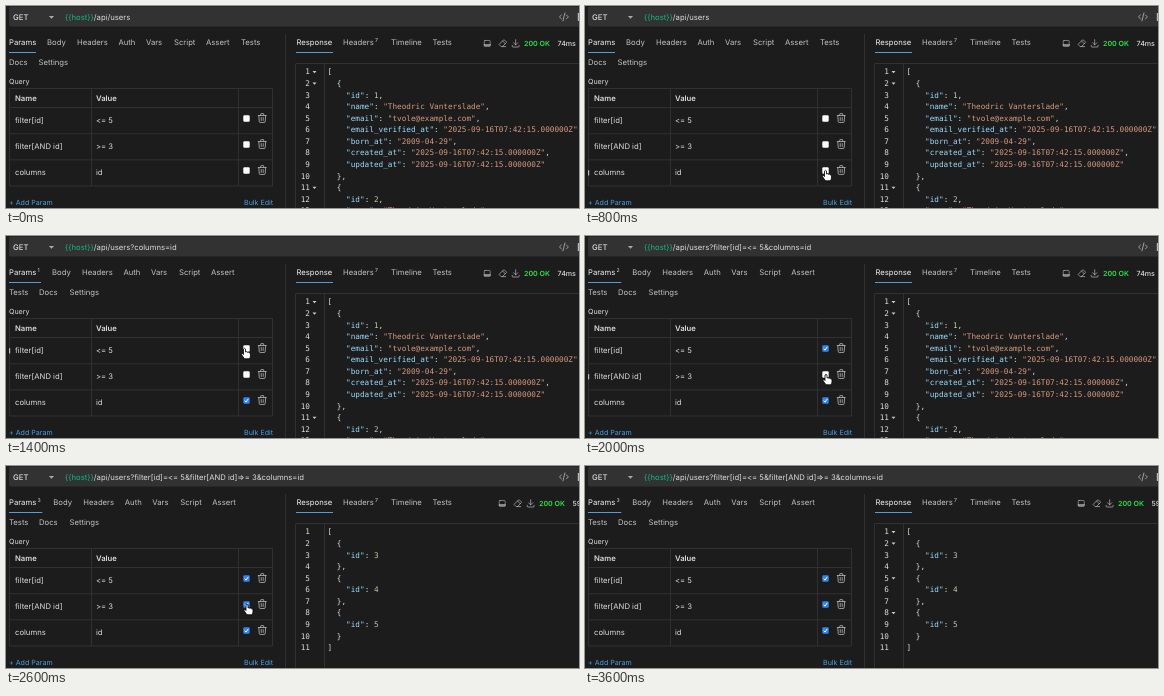
Recreate the animation shown at these times as an HTML page. Size 573 px wide and 202 px high, loop 3800 ms.

```html
<!DOCTYPE html>
<html lang="en">
<head>
<meta charset="utf-8">
<style>
html, body { margin: 0; width: 100%; height: 100%; overflow: hidden; background: #1c1c1c; }
svg { display: block; width: 573px; height: 202px; }
text { font: 7.7px Inter, sans-serif; fill: #dcdcdc; white-space: pre; text-rendering: geometricPrecision; }
.tab { fill: #c2c2c2; }
.active { fill: #f2f2f2; }
.small { font-size: 7.1px; }
.sup { font-size: 5.2px; }
.bold { font-weight: 600; }
.medium { font-weight: 500; }
.link { fill: #4a9fe0; }
.host { fill: #12b886; }
.ok { fill: #26e04a; font-weight: 600; }
.code { font: 7.69px "DejaVu Sans Mono", monospace; fill: #dedede; }
.num { text-anchor: end; }
.key { fill: #9cdcfe; }
.string { fill: #d69a80; }
.number { fill: #b5cea8; }
.rule { fill: none; stroke: #363636; stroke-width: .8; }
.icon { fill: none; stroke: #c4c4c4; stroke-width: 1.5; stroke-linecap: round; stroke-linejoin: round; }
</style>
</head>
<body>
<svg id="stage" viewBox="0 0 573 202"></svg>
<script>
const STEP = 200, LOOP = 3800;
const stage = document.getElementById('stage');

const label = (x, y, s, cls = '') => `<text x="${x}" y="${y}" class="${cls}">${s}</text>`;
const rule = d => `<path class="rule" d="${d}"/>`;
const underline = (x, w) => `<rect x="${x}" y="46" width="${w}" height="1" fill="#569cd6"/>`;
const icon = (x, y, d, scale = .494) =>
  `<path class="icon" transform="translate(${x} ${y}) scale(${scale})" d="${d}"/>`;
const caret = (x, y, w, color) =>
  `<path fill="${color}" d="M${x - w} ${y - w / 2}h${2 * w}l${-w} ${w * 1.1}z"/>`;
const escapeHtml = s => s.replace(/&/g, '&amp;').replace(/</g, '&lt;').replace(/>/g, '&gt;');

const ICONS = {
  trash: 'M4 7h16M10 11v6M14 11v6M5 7l1 12a2 2 0 0 0 2 2h8a2 2 0 0 0 2-2l1-12M9 7V4a1 1 0 0 1 1-1h4a1 1 0 0 1 1 1v3',
  code: 'M7 8l-4 4l4 4M17 8l4 4l-4 4M14 4l-4 16',
  eraser: 'M19 20H8.5l-4.2-4.3a1 1 0 0 1 0-1.4l10-10a1 1 0 0 1 1.4 0l5 5a1 1 0 0 1 0 1.4L11.5 20M18 13.3L11.7 7',
  download: 'M4 17v2a2 2 0 0 0 2 2h12a2 2 0 0 0 2-2v-2M7 11l5 5l5-5M12 4v12',
  panel: 'M6 4h12a2 2 0 0 1 2 2v12a2 2 0 0 1-2 2H6a2 2 0 0 1-2-2V6a2 2 0 0 1 2-2zM4 15h16M4 16.5h16M4 18h16'
};

const params = [
  { name: 'filter[id]', value: '<= 5', y: 112.5, checkedAt: 1600 },
  { name: 'filter[AND id]', value: '>= 3', y: 138.5, checkedAt: 2200 },
  { name: 'columns', value: 'id', y: 164.5, checkedAt: 1000 }
];

const fullResponse = `[
  {
    "id": 1,
    "name": "Theodric Vanterslade",
    "email": "tvole@example.com",
    "email_verified_at": "2025-09-16T07:42:15.000000Z",
    "born_at": "2009-04-29",
    "created_at": "2025-09-16T07:42:15.000000Z",
    "updated_at": "2025-09-16T07:42:15.000000Z"
  },
  {
    "id": 2,
    "name": "Theodric Vanterslade",`.split('\n');
const idResponse = JSON.stringify([{ id: 3 }, { id: 4 }, { id: 5 }], null, 2).split('\n');

// Pointer poses and hovered rows, each held until the next entry.
const pointerTrack = [
  [0], [200, 'arrow', 249, 190], [400, 'arrow', 244, 170], [600, 'hand', 240.5, 164],
  [1000, 'arrow', 241, 122], [1200, 'hand', 239.5, 113], [1400, 'hand', 238.5, 112],
  [1800, 'hand', 241, 135], [2000, 'hand', 241, 138], [3200]
];
const hoverTrack = [[0, -1], [400, 2], [1000, 1], [1200, 0], [1600, -1], [1800, 1], [2200, -1]];
const at = (track, t) => track.filter(([start]) => start <= t).pop();

function urlBar(t) {
  const query = params.filter(p => t >= p.checkedAt).map(p => `${p.name}=${p.value}`).join('&');
  const path = '/api/users' + (query && '?' + query);
  return `<rect x="3" y="0.5" width="575" height="20" rx="2" fill="#323232"/>`
    + label(7, 13.8, 'GET', 'medium') + caret(45.5, 11.3, 2.6, '#aaa')
    + label(59, 13.8, `<tspan class="host">{{host}}</tspan>${escapeHtml(path)}`)
    + icon(552, 5, ICONS.code) + '<rect x="571.8" y="7" width="1.2" height="8" fill="#bbb"/>';
}

function requestTabs(count) {
  const shift = [0, 5, 6.3, 6.3][count];
  const tabs = [['Body', 41], ['Headers', 71], ['Auth', 112.5], ['Vars', 140], ['Script', 168], ['Assert', 200]];
  const wrapped = count ? [['Tests', 3], ['Docs', 33], ['Settings', 63.5]] : [['Docs', 3], ['Settings', 32.5]];
  if (!count) tabs.push(['Tests', 235]);
  return label(3, 39, 'Params', 'active') + (count ? label(31.5, 36.4, count, 'sup') : '')
    + underline(3, 27 + shift)
    + tabs.map(([s, x]) => label(x + shift, 39, s, 'tab')).join('')
    + wrapped.map(([s, x]) => label(x, 58.8, s, 'tab')).join('');
}

function checkbox(y, checked) {
  return `<rect x="237.3" y="${y - 3.2}" width="6.4" height="6.4" rx="1.2" fill="${checked ? '#2f86f0' : '#fff'}"/>`
    + (checked ? `<path d="M238.7 ${y + .1}l1.3 1.5l2.3-3.2" fill="none" stroke="#fff" stroke-width="1"/>` : '');
}

function queryTable(t) {
  const hovered = at(hoverTrack, t)[1];
  return label(3, 77.5, 'Query', 'small')
    + rule('M3.5 82.5H266.5V180H3.5zM3.5 101.5H266.5M3.5 127.8H266.5M3.5 153.9H266.5M85.5 82.5V180M232.5 82.5V180')
    + label(9, 94.6, 'Name', 'bold') + label(90, 94.6, 'Value', 'bold')
    + params.map((p, i) => label(9, p.y + 4.6, p.name) + label(90, p.y + 4.6, escapeHtml(p.value))
      + checkbox(p.y, t >= p.checkedAt) + icon(250.3, p.y - 6.4, ICONS.trash)
      + (i === hovered ? `<rect x="3" y="${p.y - .5}" width="1.2" height="5.5" rx=".5" fill="#bbb"/>` : '')).join('')
    + label(3, 199, '+ Add Param', 'small link') + label(238, 199, 'Bulk Edit', 'small link');
}

function responseHeader(done) {
  const shift = done ? 15 : 0;
  return label(290.5, 39, 'Response', 'active') + underline(290, 37)
    + label(337, 39, 'Headers', 'tab') + label(369, 36.4, '7', 'sup')
    + label(385, 39, 'Timeline', 'tab') + label(426.5, 39, 'Tests', 'tab')
    + icon(476.8 + shift, 33, ICONS.panel, .37) + icon(491.5 + shift, 32, ICONS.eraser, .43)
    + icon(504.5 + shift, 32, ICONS.download, .43)
    + label(518 + shift, 39.6, '200 OK', 'small ok')
    + label(551.5 + shift, 39.6, done ? '591ms' : '74ms', 'small medium');
}

const highlight = line => line.replace(/("[^"]*")(:?)|\d+/g, (s, text, colon) =>
  !text ? `<tspan class="number">${s}</tspan>`
    : `<tspan class="${colon ? 'key' : 'string'}">${text}</tspan>${colon}`);

function responseBody(done, foldable) {
  return rule('M279.5 28V202M290 57.5H573M289.5 57.5V202M318.5 57.5V202')
    + (done ? idResponse : fullResponse).map((line, i) => {
      const y = 68.4 + i * 11.58;
      return label(304, y, i + 1, 'code num') + label(321.6, y, highlight(line), 'code')
        + (foldable && /[[{]$/.test(line) ? caret(308.5, y - 2.4, 2, '#ccc') : '');
    }).join('');
}

function pointer(t) {
  const [, kind, x, y] = at(pointerTrack, t);
  if (!kind) return '';
  const shape = kind === 'arrow'
    ? '<path d="M0 0V10L2.3 7.9L3.9 11.6L5.6 10.9L4 7.3H7.2z" fill="#000" stroke="#fff" stroke-width=".8"/>'
    : '<path d="M-1 1Q0-.4 1 1V4Q2 3.2 2.9 4.3Q4 3.7 4.6 4.8Q6 4.5 6 6V8Q5.8 9.5 4.8 10.8H0Q-1.4 9-3 6.6Q-3.2 5.2-1.8 5.7L-1 6.5z" fill="#fff" stroke="#000" stroke-width=".8"/>';
  return `<g transform="translate(${x} ${y})">${shape}</g>`;
}

function draw(t) {
  const done = t >= 2600, foldable = !done || t >= 2800;
  const count = params.filter(p => t >= p.checkedAt).length;
  stage.innerHTML = urlBar(t) + requestTabs(count) + queryTable(t)
    + responseHeader(done) + responseBody(done, foldable) + pointer(t);
}

const start = performance.now();
let shown = -1;
function tick() {
  const t = Math.floor((performance.now() - start) % LOOP / STEP) * STEP;
  if (t !== shown) draw(shown = t);
  requestAnimationFrame(tick);
}
tick();
</script>
</body>
</html>
```
